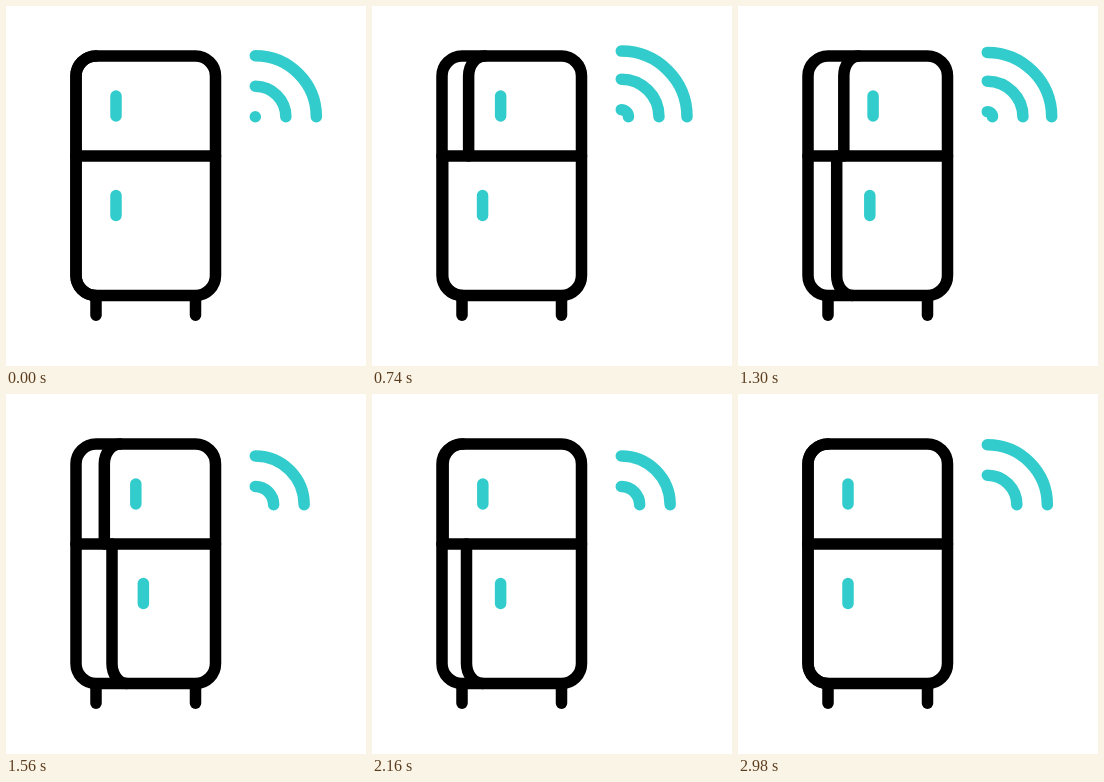
Animation of 360x360 px, one loop 3 s. Source, as an HTML page:

```html
<!DOCTYPE html>
<html lang="en">
<head>
<meta charset="utf-8">
<title>Smart fridge</title>
<style>
  html, body { margin: 0; width: 100%; height: 100%; overflow: hidden; background: #fff; }
  svg { display: block; width: 360px; height: 360px; }
  path, rect { fill: none; stroke: #000; stroke-width: 11.5; stroke-linecap: round; }
  .teal { stroke: #33cccc; }
</style>
</head>
<body>
<svg viewBox="0 0 360 360">
  <path d="M90 290V309.2M189.5 290V309.2"/>
  <path id="topEdge"/>
  <path id="lowEdge"/>
  <rect x="70" y="50" width="139.5" height="239.5" rx="20"/>
  <path d="M70 150H209.5"/>
  <path id="topHandle" class="teal" d="M110 90V110"/>
  <path id="lowHandle" class="teal" d="M110 189.5V209.5"/>
  <path id="wave0" class="teal"/>
  <path id="wave1" class="teal"/>
  <path id="wave2" class="teal"/>
</svg>
<script>
  const LOOP = 3000, PULSE = 600, GAP = 30.5;
  const LEFT = 70, WIDTH = 139.5, OPEN = 36;
  const $ = id => document.getElementById(id);
  const waves = [0, 1, 2].map(i => $('wave' + i));

  const doors = [
    { edge: $('topEdge'), handle: $('topHandle'), delay: 145, grip: 0.7, bend: 70, end: 50 },
    { edge: $('lowEdge'), handle: $('lowHandle'), delay: 665, grip: 0.76, bend: 269.5, end: 289.5 }
  ];

  function ease(t, from, to) {
    const p = Math.min(1, Math.max(0, (t - from) / (to - from)));
    return p * p * (3 - 2 * p);
  }

  function drawDoor(door, time) {
    const t = time - door.delay;
    const shift = OPEN * (ease(t, 0, 895) - ease(t, 1115, 2125));
    const x = LEFT + shift;
    const rx = 20 * (1 - shift / WIDTH);
    const sweep = door.end < door.bend ? 1 : 0;
    door.edge.setAttribute('d',
      `M${x} 150V${door.bend}A${rx} 20 0 0 ${sweep} ${x + rx} ${door.end}`);
    door.handle.setAttribute('transform', `translate(${shift * door.grip} 0)`);
  }

  // Waves travel outwards; the outermost slows down and then vanishes.
  function drawWaves(time) {
    const p = time % PULSE / PULSE;
    waves.forEach((wave, i) => {
      const r = i < 2 ? GAP * (i + p) : 2 * GAP + 20 * p;
      const size = Math.max(r, 0.01);
      wave.setAttribute('d', `M249.3 ${110.8 - size}a${size} ${size} 0 0 1 ${size} ${size}`);
      wave.style.display = i === 2 && p >= 0.3 ? 'none' : '';
    });
  }

  function draw() {
    const time = performance.now() % LOOP;
    doors.forEach(door => drawDoor(door, time));
    drawWaves(time);
    requestAnimationFrame(draw);
  }
  draw();
</script>
</body>
</html>
```
